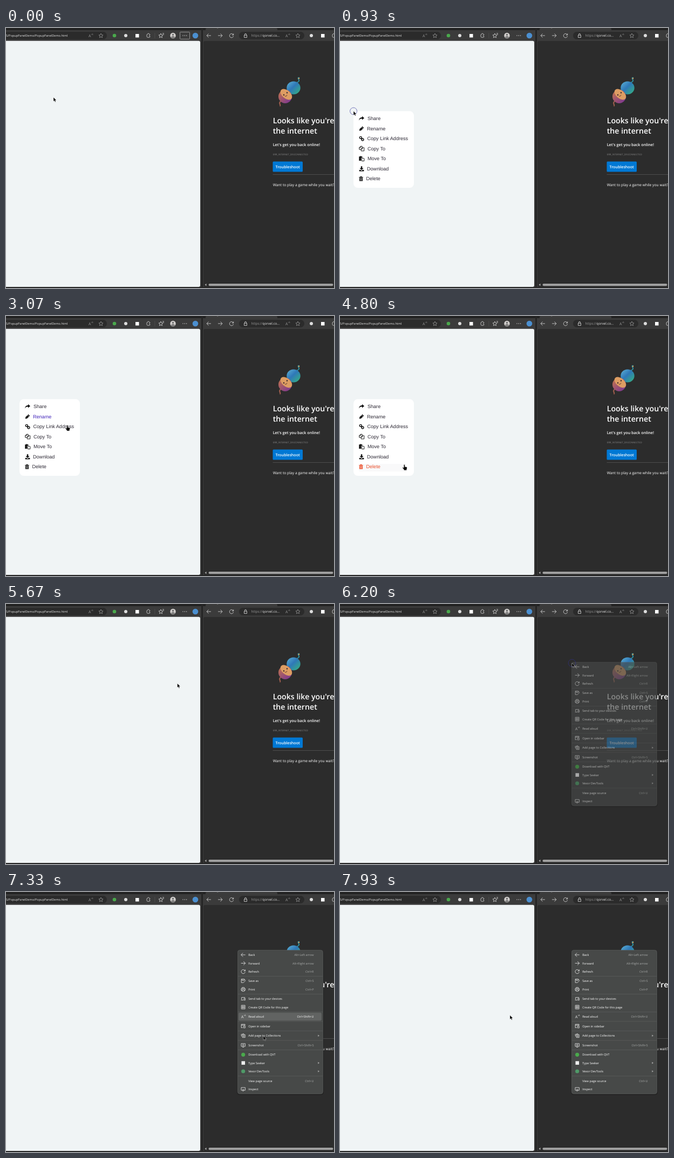
Recreate the animation shown at these times as an HTML page. Size 608 by 480 pixels, loop 8000 ms.

```html
<!DOCTYPE html>
<html lang="en">
<head>
<meta charset="utf-8">
<title>Custom context menu</title>
<style>
html, body { margin: 0; width: 100%; height: 100%; overflow: hidden; background: #3b3b3b; }
svg { display: block; width: 608px; height: 480px; text-rendering: geometricPrecision; }
text { font-family: "Open Sans", "Noto Sans", sans-serif; }
#panel text { font-family: "Liberation Sans", Arial, sans-serif; }
</style>
</head>
<body>
<svg id="stage" viewBox="0 0 608 480"></svg>
<script>
const LOOP = 8000, FADE = 500;
const $ = id => document.getElementById(id);
const text = (x, y, s, size, fill = '#fff', more = '') =>
  `<text x="${x}" y="${y}" font-size="${size}" fill="${fill}" ${more}>${s}</text>`;
const rect = (x, y, w, h, fill, r = 0, more = '') =>
  `<rect x="${x}" y="${y}" width="${w}" height="${h}" fill="${fill}" rx="${r}" ${more}/>`;
const dot = (x, y, r, fill, more = '') => `<circle cx="${x}" cy="${y}" r="${r}" fill="${fill}" ${more}/>`;
const line = (x, y, d, color = '#ddd', w = .8) =>
  `<path transform="translate(${x} ${y})" d="${d}" fill="none" stroke="${color}" stroke-width="${w}" stroke-linejoin="round"/>`;

// 8px line icons around their centre
const I = {
  back: 'M4 0H-4M-.5-3.5L-4 0L-.5 3.5',
  forward: 'M-4 0H4M.5-3.5L4 0L.5 3.5',
  refresh: 'M3.5-1A3.7 3.7 0 1 0 3.6 1M3.7-3.7V-1H1',
  star: 'M0-4L1.2-1.3L4-1L1.9 .9L2.5 3.8L0 2.3L-2.5 3.8L-1.9 .9L-4-1L-1.2-1.3Z',
  puzzle: 'M-3-1Q-3-2.7-1.3-2.7C-1.4-4.4 1.4-4.4 1.3-2.7Q3-2.7 3-1C1-1 1 1.6 3 1.5Q3 3.3 1.3 3.3H-1.3Q-3 3.3-3 1.5Z',
  lock: 'M-2.5-.8H2.5V3.5H-2.5ZM-1.5-.8V-2.2A1.5 1.5 0 0 1 1.5-2.2V-.8M0 1V1.6',
  save: 'M0 3H-3.5V-3.5H2L3.5-2V0M-2-3.5V-1H1.5V-3.5M0 3.5L3.5 0',
  print: 'M-2-1.5V-3.5H2V-1.5M-2 2H-3.7V-1.5H3.7V2H2M-2 .5H2V3.5H-2Z',
  devices: 'M-3 1.3V-2.5H3.5M-4 2.3H.5M1.5-1H3.7V2.5H1.5Z',
  code: 'M-3.4-3.4H3.4V3.4H-3.4ZM-1.2-3V3M1.2-3V3M-3 0H3',
  sidebar: 'M-1 3H-3.5V-3.3H3.3V-1M-3.5-1.6H3.3M.5 .2H3.6V3.4H.5Z',
  collect: 'M-1.5-1.8H3.5V3.4H-1.5ZM-2.8 1.5L-3.8-2L.8-3.7L1.5-2.2M1-.6V2.3M-.4 .8H2.5',
  shot: 'M-3.7-3H3.7V2.2H-3.7ZM-1.5 3.7H1.5M-1.2-.4A1.2 1.2 0 1 0 1.2-.4A1.2 1.2 0 1 0-1.2-.4',
  inspect: 'M-.5 2H-3.7V-3H3.7V2H2M-.5 .2V3.8L2 1.8Z'
};
const readIcon = (x, y, c) => text(x - 4, y + 2.8, 'A', 7, c) + line(x + 2.2, y - 2, 'M-.7-1L.2 1M1-1.8L2 1', c, .6);
const addressTools = x => readIcon(x, 14, '#999') + line(x + 19, 14, I.star, '#999');

function browsers() {
  return rect(0, 0, 608, 480, '#3b3b3b') + rect(0, 0, 608, 4, '#222') + rect(370, 0, 133, 5, '#3b3b3b', 2) +
    rect(0, 478, 608, 2, '#262626') + text(391, 1.5, '–', 5, '#aaa') +
    rect(-8, 7, 195, 14, '#2b2b2b', 7) +
    text(0, 16.2, 'S/PopupPanelDemo/PopupPanelDemo.html', 5.55, '#e8e8e8') + addressTools(157) +
    dot(201, 14, 3.3, '#4aa94c') + dot(222, 14, 3, '#ddd') + rect(240, 11, 6.5, 6.5, '#fff') +
    line(264, 14, I.puzzle) + rect(275.5, 9, .7, 10, '#555') +
    line(287, 14, I.star) + line(290, 12, 'M0-2H3M1 0H3') +
    dot(309.5, 14, 5.2, '#d5d2d0') + dot(309.5, 12.4, 1.9, '#777') +
    '<path d="M306 17.5Q306 15 309.5 15T313 17.5Q309.5 20 306 17.5" fill="#777"/>' +
    rect(322.5, 7.5, 18, 13, 'none', 1, 'id="focus" stroke="#aaa" stroke-width=".8"') +
    [328, 331.3, 334.6].map(x => dot(x, 14, .7, '#ddd')).join('') + dot(351, 14, 5.3, '#4b8fd0') +
    rect(-4, 23.7, 364, 454.3, '#f0f4f5', 3) +
    rect(362, 0, 3, 480, '#252525') +
    // right window
    line(376, 14, I.back) + line(397, 14, I.forward) + line(418, 14, I.refresh) +
    rect(432, 7, 121, 14, '#2b2b2b', 7) + line(444, 14, I.lock) +
    text(454.5, 16.3, 'https://<tspan fill="#eee">qorvel.co...</tspan>', 6.2, '#999') + addressTools(522) +
    dot(566, 14, 3, '#ddd') + rect(584, 11, 6.5, 6.5, '#fff') + line(608, 14, I.puzzle) +
    rect(366, 24, 250, 454, '#2c2c2c', 3) +
    '<path d="M371.5 471.8V476.2L368.5 474Z" fill="#aaa"/>' + rect(375.5, 472, 231, 4.2, '#9f9f9f', 2.1);
}

function offlinePage() {
  return `<defs><linearGradient id="teal" x1="0" y1="0" x2="1" y2="1"><stop stop-color="#5fb4d6"/>
    <stop offset=".45" stop-color="#2f78b8"/><stop offset="1" stop-color="#35b67c"/></linearGradient>
    <linearGradient id="plum" x1="0" y1="0" x2="1" y2="1"><stop stop-color="#c87848"/><stop offset="1" stop-color="#743099"/></linearGradient></defs>` +
    line(541, 100, 'M-3 1Q4-1 1.5-5T3-8', '#2d91a0', 2) + dot(543, 93, 1.3, '#d59a58') +
    line(509, 136, 'M3-2Q-3 0-1.5 4T-1.5 8', '#a5604f', 2) +
    '<ellipse cx="533" cy="110.5" rx="12.7" ry="12" fill="url(#teal)"/>' +
    dot(517.5, 126.5, 12.5, 'url(#plum)') +
    '<ellipse cx="519.5" cy="122.5" rx="12.5" ry="7.5" transform="rotate(40 519.5 122.5)" fill="#dd9d63"/>' +
    dot(515, 123.5, 1.2, '#35232b') + dot(521, 119.5, 1.2, '#35232b') +
    line(519, 125, 'M-2 1Q1 2 2-1.5', '#5b3028', .9) +
    text(494.7, 175.8, 'Looks like you\'re', 14.2, '#fff', 'font-weight="600"') +
    text(494.7, 195.2, 'the internet', 14.2, '#fff', 'font-weight="600"') +
    text(494.7, 217.7, 'Let\'s get you back online!', 7.2, '#fff', 'font-weight="600"') +
    text(494.7, 235.3, 'ERR_INTERNET_DISCONNECTED', 4.4, '#858585') +
    rect(494.5, 246.5, 55.5, 19, '#0078d4', 1.5) +
    text(499.5, 258.7, 'Troubleshoot', 7.1, '#fff', 'font-weight="600"') +
    rect(494.5, 270, 114, .8, '#555') +
    text(494.7, 291.8, 'Want to play a game while you wait?', 6.77);
}

// label, text x, icon, hover start, hover end
const items = [
  ['Share', 51, '<path d="M-5 4.5C-5-1-2-2.2 1-2.2V-4.5L5.2-.8L1 2.8V.6C-2 .6-4 1-5 4.5Z"/>', 1640, 2280],
  ['Rename', 50, '<path d="M-4.5 4.5L-3.8 1L1.6-4.2L4.4-1.4L-1 3.8Z"/><path d="M.2-2.6L2.8 0" stroke="#fff" stroke-width=".8"/>', 2290, 3040],
  ['Copy Link Address', 50.5, '<g fill="none" stroke="currentColor" stroke-width="1.5"><circle cx="-1.8" cy="-1.8" r="2.1"/><circle cx="2" cy="2" r="2.1"/><path d="M-1.2-1.2L1.4 1.4"/></g>', 3080, 3220],
  ['Copy To', 51, '<path d="M-1 1.8H-4.5V-2L-2-4.5H1.2V-1.5M-4.5-1.8H-1.8V-4.5M-.8 4.6V.4L1.4-1.8H4.9V4.6ZM-.8 .6H1.6V-1.8" fill="none" stroke="currentColor"/>', 3220, 3330],
  ['Move To', 51, '<path d="M-5-4H-3C-2.6-5.4-.8-5.4-.4-4H1.5V-1.8H-.8V4H-5Z"/><path d="M.3-.8H3L5-.2V4.7H.3Z" fill="none" stroke="currentColor"/>', 3330, 3500],
  ['Download', 50, '<path d="M-1.3-4.5H1.3V-1H3.8L0 2.7L-3.8-1H-1.3ZM-4.6 2.5H-2L0 4L2 2.5H4.6V5H-4.6Z"/>', 3500, 3880],
  ['Delete', 48.5, '<path d="M-4-3.4H-1.6L-1-4.6H1L1.6-3.4H4V-2.3H-4ZM-3.3-1.7H3.3V4.6H-3.3Z"/><path d="M-1.5-.6V3.4M0-.6V3.4M1.5-.6V3.4" stroke="#fff" stroke-width=".6"/>', 3900, 4870]
];
const itemY = i => 167 + i * 18.53;

function panel() {
  return '<g id="panel">' + rect(25, 153.5, 112, 141.5, '#fff', 8) + items.map(([label, x, icon], i) =>
    rect(35, itemY(i) - 5, 88, 14, '#f9f9fa', 2, `id="bg${i}"`) +
    `<g id="ic${i}" fill="currentColor" transform="translate(${i > 5 ? 39 : 40} ${itemY(i)}) scale(.95)">${icon}</g>` +
    text(x, itemY(i) + 3, label, 9.07, '#2b2733', `id="tx${i}"`)).join('') + '</g>';
}

// y, label, icon, shortcut ('>' opens a submenu)
const rows = [
  [116, 'Back', I.back, 'Alt+Left arrow'], [131.5, 'Forward', I.forward, 'Alt+Right arrow'],
  [146.8, 'Refresh', I.refresh, 'Ctrl+R'], [164.3, 'Save as', I.save, 'Ctrl+S'],
  [179.7, 'Print', I.print, 'Ctrl+P'], [197.2, 'Send tab to your devices', I.devices],
  [212.5, 'Create QR Code for this page', I.code], [230, 'Read aloud', 'read', 'Ctrl+Shift+U'],
  [247.5, 'Open in sidebar', I.sidebar], [265.2, 'Add page to Collections', I.collect, '>'],
  [282.8, 'Screenshot', I.shot, 'Ctrl+Shift+S'], [300.3, 'Download with QVT', '#4aa94c'],
  [315.6, 'Type Seeker', 'square', '>'], [331, 'Vexor DevTools', '#4f9a68', '>'],
  [348.6, 'View page source', '', 'Ctrl+U'], [364, 'Inspect', I.inspect]
];

function rowIcon(y, icon) {
  if (icon === 'read') return readIcon(440, y, '#eee');
  if (icon === 'square') return rect(436.5, y - 3.3, 6.6, 6.6, '#eee');
  if (icon[0] === '#') return dot(439.7, y, 3.6, icon);
  return line(439.7, y, icon, '#eee');
}

function contextMenu() {
  const rules = [155.6, 188.4, 221.3, 238.8, 256.3, 274, 291.5, 339.8];
  return '<g id="ctx">' + rect(428, 108, 161, 267, '#000', 5, 'opacity=".18"') +
    rect(429.4, 107.4, 158, 265.2, '#474948', 4, 'stroke="#5b5d5c" stroke-width=".8"') +
    rect(431, 0, 154, 14.6, '#616362', 2, 'id="hover"') +
    rules.map(y => rect(430, y - .3, 157, .7, '#5c5e5d')).join('') +
    rows.map(([y, label, icon, key], i) => rowIcon(y, icon) + text(449.2, y + 2, label, 5.5) +
      (key === '>' ? `<path d="M578.3 ${y - 1.8}V${y + 1.8}L581 ${y}Z" fill="#aaa"/>`
        : key ? text(570.5, y + 2, key, 5.5, '', `id="key${i}" text-anchor="end"`) : '')).join('') + '</g>';
}

const pointers = dot(0, 0, 0, 'none', 'id="ripple" stroke="#30309a"') +
  '<g id="cursor" stroke="#fff" stroke-width=".4">' +
  '<path id="arrow" d="M0 0V7.6L1.8 6L3 8.8L4.3 8.2L3.1 5.5H5.5Z"/>' +
  '<path id="hand" d="M-1 0Q0-1 1 0V3.4L4 4Q5.2 4.4 5 5.6L4.3 8.5V10H-.8V8.8L-3.4 5.4Q-3.4 4.2-2.2 4.7L-1 5.6Z"/></g>';

$('stage').innerHTML = browsers() + offlinePage() + panel() + contextMenu() + pointers;

// pointer route: time, x, y
const route = [
  [0, 88, 128], [130, 88, 128], [470, 30.5, 149.5], [670, 30.5, 149.5], [730, 25, 153.5], [1250, 25, 153.5],
  [1640, 70, 168], [1870, 75.5, 171], [2130, 107, 174], [2270, 107, 174], [2400, 109, 187], [2600, 109, 187],
  [3070, 113.5, 202], [3400, 112, 232], [3470, 112, 232], [3930, 112, 275], [4670, 112, 275], [4800, 119, 275],
  [5470, 299, 153], [5600, 299, 153], [6100, 430, 109], [6400, 430, 109], [6600, 455, 150], [6850, 480, 331],
  [7050, 470, 265], [7200, 470, 180], [7270, 474, 230], [7330, 477, 265], [7450, 480, 360], [7520, 475, 358],
  [7930, 315, 227.5], [LOOP, 315, 227.5]
];
const rightClicks = [850, 6100];

function pointer(t) {
  const i = Math.max(1, route.findIndex(k => k[0] >= t));
  const [t0, x0, y0] = route[i - 1], [t1, x1, y1] = route[i];
  const p = (t - t0) / (t1 - t0);
  return [x0 + (x1 - x0) * p, y0 + (y1 - y0) * p];
}

const clamp = v => Math.min(1, Math.max(0, v));
const mix = (a, b, p) => `rgb(${a.map((v, i) => Math.round(v + (b[i] - v) * p))})`;
const show = (id, on) => $(id).setAttribute('visibility', on ? 'inherit' : 'hidden');
const set = (id, attrs) => Object.entries(attrs).forEach(([k, v]) => $(id).setAttribute(k, v));
const DARK = [43, 39, 51], PURPLE = [68, 35, 205], RED = [235, 79, 43];

function draw(t) {
  const [x, y] = pointer(t);
  const open = t >= 870 && t < 5560;
  show('focus', t < 870);
  show('panel', open);
  items.forEach(([, , , from, to], i) => {
    const on = t >= from && t < to, color = i > 5 ? RED : PURPLE;
    const p = t < to ? clamp((t - from) / FADE) : clamp(clamp((to - from) / FADE) - (t - to) / FADE);
    show('bg' + i, on);
    set('ic' + i, { color: mix([17, 17, 17], color, +on) });
    set('tx' + i, { fill: mix(DARK, color, p * p) });
  });

  set('ctx', { opacity: clamp((t - 6095) / 165) });
  const [hx, hy] = pointer(Math.max(0, t - 60));
  const active = t > 6400 && hx > 431 && hx < 585 ? rows.findIndex(r => Math.abs(r[0] - hy) < 7.6) : -1;
  show('hover', active >= 0);
  if (active >= 0) set('hover', { y: rows[active][0] - 7.2 });
  rows.forEach((r, i) => $('key' + i) && set('key' + i, { fill: i === active ? '#fff' : '#a9abaa' }));

  const click = rightClicks.map(c => (t - c) / 220).find(p => p >= 0 && p < 1);
  set('ripple', { cx: x, cy: y, r: 5 + 4 * (click || 0), opacity: click === undefined ? 0 : 1 - click });

  const overItem = open && x > 35 && x < 123 && y > 160 && y < 287;
  show('hand', overItem);
  show('arrow', !overItem);
  set('cursor', { transform: `translate(${x} ${y})` });
}

function tick() {
  draw(performance.now() % LOOP);
  requestAnimationFrame(tick);
}
tick();
</script>
</body>
</html>
```
